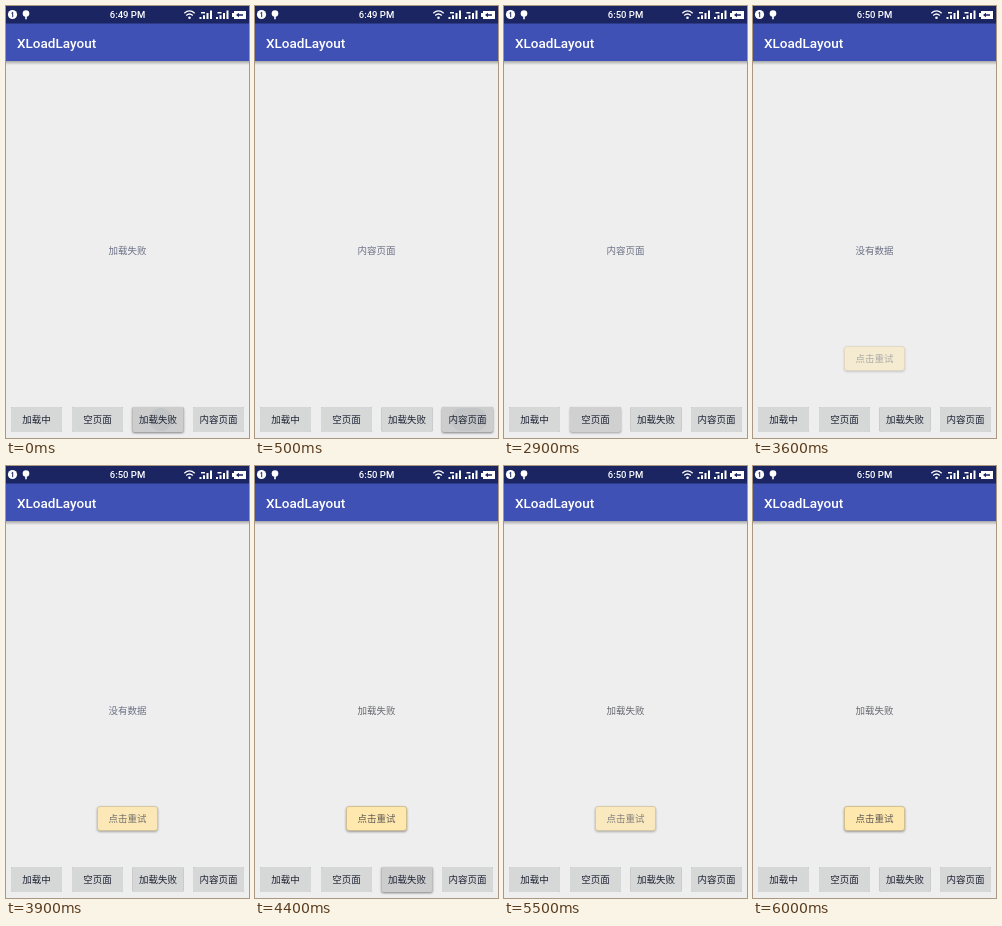
Animation of 243 by 432 pixels, one loop 6.1 s. Source, as an HTML page:

```html
<!DOCTYPE html>
<html lang="zh-CN">
<head>
<meta charset="utf-8">
<title>XLoadLayout</title>
<style>
html, body { margin: 0; width: 100%; height: 100%; overflow: hidden; background: #eee; }
svg { display: block; width: 100vw; height: 100vh; }
text { font: 9.5px Roboto, "Noto Sans CJK SC", "Noto Sans CJK", sans-serif; text-anchor: middle; }
.clock { font-weight: 500; fill: #fff; }
.title { font-size: 13.5px; font-weight: 500; fill: #fff; text-anchor: start; }
.page { fill: #6c7186; }
.buttons text { font-weight: 500; fill: #1d2333; }
.key { fill: #d6d7d7; filter: drop-shadow(0 .8px .6px #0006); }
.held { fill: #cdcdce; filter: drop-shadow(0 1.5px 1.3px #0007); }
.ripple { fill: #c3c4c5; }
.retry rect { fill: #ffe8ae; stroke: #cfb98a; stroke-width: .8; filter: drop-shadow(0 1.2px 1px #0006); }
.retry text { fill: #5d5a55; }

/* One loop is 6.1 s, so 100 ms is about 1.64 %. */
.step { animation: 6.1s step-end infinite; }
.before { animation-name: before; }
.after { animation-name: after; }
.fail { animation-name: fail; }
.content { animation-name: content; }
.empty { animation-name: empty; }
.has-retry { animation-name: has-retry; }
.dim { animation-name: dim; }
.press2 { animation-name: press2; }
.press3 { animation-name: press3; }
.press4 { animation-name: press4; }
.first-ripple { animation-name: first-ripple; }

@keyframes before { 0% { opacity: 1 } 47.5%, 100% { opacity: 0 } }
@keyframes after { 0% { opacity: 0 } 47.5%, 100% { opacity: 1 } }
@keyframes fail {
  0% { opacity: 1; fill: #6c7186 }
  6.5% { opacity: 0; fill: #6c7186 }
  70.4%, 100% { opacity: 1; fill: #686970 }
}
@keyframes content { 0% { opacity: 0 } 6.5% { opacity: 1 } 49.1%, 100% { opacity: 0 } }
@keyframes empty { 0% { opacity: 0 } 49.1% { opacity: 1 } 70.4%, 100% { opacity: 0 } }
@keyframes has-retry { 0% { opacity: 0 } 49.1%, 100% { opacity: 1 } }
@keyframes dim {
  0% { opacity: 1 }
  55.7% { opacity: .75 } 57.3% { opacity: .5 } 59% { opacity: .45 }
  60.6% { opacity: .55 } 62.2% { opacity: .7 } 63.9% { opacity: .85 } 65.5% { opacity: 1 }
  90.1% { opacity: .75 } 91.8% { opacity: .5 } 93.4% { opacity: .45 }
  95% { opacity: .65 } 96.7% { opacity: .85 } 98.3%, 100% { opacity: 1 }
}
@keyframes press2 {
  0% { opacity: 0 } 47.5% { opacity: .7 } 49.1% { opacity: 1 }
  50.8% { opacity: .5 } 52.4%, 100% { opacity: 0 }
}
@keyframes press3 {
  0% { opacity: 1 } 1.6% { opacity: .5 } 3.2% { opacity: 0 }
  68.8% { opacity: .6 } 70.4% { opacity: 1 } 73.7% { opacity: .8 }
  75.4% { opacity: .5 } 77% { opacity: .25 } 78.6%, 100% { opacity: 0 }
}
@keyframes press4 {
  0% { opacity: 0 } 4.9% { opacity: .6 } 6.5% { opacity: 1 }
  9.8% { opacity: .5 } 11.4%, 100% { opacity: 0 }
}
@keyframes first-ripple { 0% { opacity: 1 } 3.2%, 100% { opacity: 0 } }
</style>
</head>
<body>
<svg viewBox="0 0 243 432" preserveAspectRatio="none">
  <defs>
    <linearGradient id="shade" x2="0" y2="1">
      <stop stop-opacity=".3"/>
      <stop offset="1" stop-opacity="0"/>
    </linearGradient>
    <rect id="key" width="51" height="25" rx="1.4"/>
    <path id="signal" d="M0 13v-2h2v2zM3.5 13V9.2h2V13zM7 13V7h2v6zM10.5 13V4.5h2V13zM1.5 6h4v1.5h-4z"/>
  </defs>

  <rect width="243" height="432" fill="#eee"/>
  <rect y="55" width="243" height="4" fill="url(#shade)"/>
  <rect y="17" width="243" height="38" fill="#3f51b5"/>
  <rect width="243" height="17.5" fill="#1b2561"/>

  <g fill="#fff">
    <circle cx="6.5" cy="8.5" r="4.6"/>
    <path d="M5.5 7.2l1.2-1v5" fill="none" stroke="#1b2561"/>
    <circle cx="20" cy="7.5" r="3.3"/>
    <path d="M19.2 10h1.6v3.2h-1.6z"/>
    <g fill="none" stroke="#fff" stroke-width="1.3">
      <path d="M178.3 7.2q5.2-4.6 10.4 0M180.2 9.4q3.3-2.8 6.6 0"/>
    </g>
    <circle cx="183.5" cy="11.7" r="1.3"/>
    <use href="#signal" x="193.5"/>
    <use href="#signal" x="210"/>
    <path d="M226 7h2V5h12v8h-12v-2h-2z"/>
    <path d="M230 9l3-2.3v1.5h4v1.6h-4v1.5z" fill="#1b2561"/>
  </g>
  <text class="clock step before" x="121.5" y="12.3">6:49 PM</text>
  <text class="clock step after" x="121.5" y="12.3">6:50 PM</text>
  <text class="title" x="11" y="41.5">XLoadLayout</text>

  <text class="page step fail" x="121.5" y="247.5">加载失败</text>
  <text class="page step content" x="121.5" y="247.5">内容页面</text>
  <text class="page step empty" x="121.5" y="247.5">没有数据</text>

  <g class="step has-retry">
    <g class="retry step dim">
      <rect x="91.5" y="340.5" width="60" height="24" rx="2.5"/>
      <text x="121.5" y="356.3">点击重试</text>
    </g>
  </g>

  <g class="buttons">
    <g transform="translate(5 401)">
      <use href="#key" class="key"/>
      <text x="25.5" y="15.7">加载中</text>
    </g>
    <g transform="translate(66 401)">
      <use href="#key" class="key"/>
      <use href="#key" class="held step press2"/>
      <text x="25.5" y="15.7">空页面</text>
    </g>
    <g transform="translate(126.5 401)">
      <use href="#key" class="key"/>
      <g class="step press3">
        <use href="#key" class="held"/>
        <circle class="ripple step first-ripple" cx="28.5" cy="12.5" r="11.5"/>
      </g>
      <text x="25.5" y="15.7">加载失败</text>
    </g>
    <g transform="translate(187 401)">
      <use href="#key" class="key"/>
      <g class="step press4">
        <use href="#key" class="held"/>
        <rect class="ripple" x="9" y="1" width="36" height="23" rx="11.5"/>
      </g>
      <text x="25.5" y="15.7">内容页面</text>
    </g>
  </g>
</svg>
</body>
</html>
```
